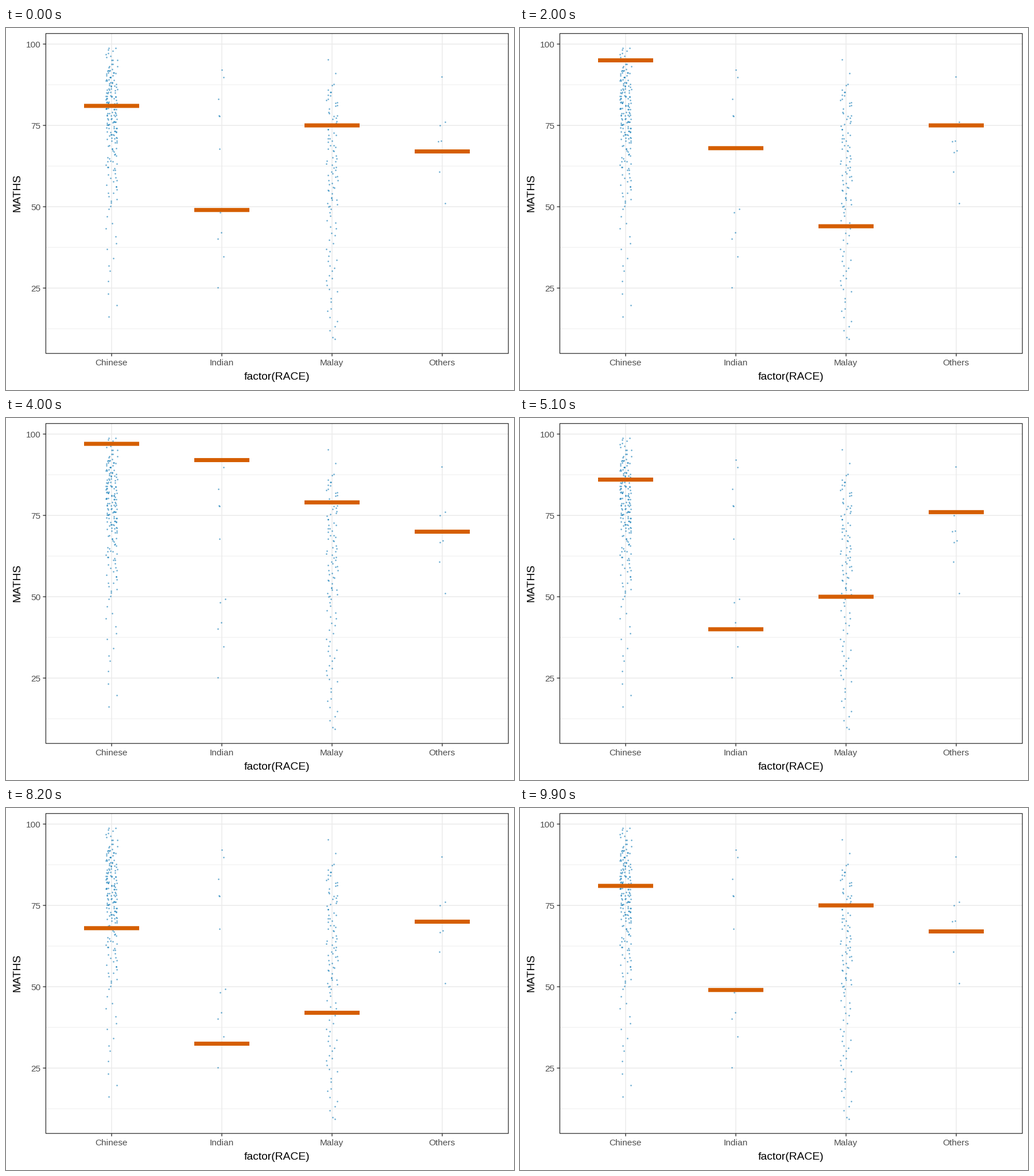
A matplotlib script for the animation above (10000 ms loop, 885 by 632 pixels).

```python
import numpy as np
import matplotlib.pyplot as plt
from matplotlib.animation import FuncAnimation
from matplotlib.patches import Rectangle

W, H, DPI = 885, 632, 100
PX = 72 / DPI
LEFT, RIGHT, TOP, BOTTOM = 69.4, 875.2, 9.6, 568.2
GROUPS = ["Chinese", "Indian", "Malay", "Others"]
CENTERS = 184 + 192 * np.arange(4)
BAR_W, BAR_H = 96, 7.1
DARK, GREY, GRID = "#333333", "#4D4D4D", "#EBEBEB"

plt.rcParams["font.family"] = "Liberation Sans"
plt.rcParams["path.snap"] = False
rng = np.random.default_rng(12)


def y_of(score):
    return 596.05 - 5.68 * score


def spread(count, shares, marks):
    """Whole scores whose cumulative shares pass through the given marks."""
    return np.round(np.interp(np.linspace(0, 1, count), shares, marks))


SCORES = [
    spread(193, [0, .02, .07, .15, .28, .5, .75, .93, 1],
           [16, 30, 50, 60, 70, 78, 86, 93, 99]),
    np.array([25, 35, 40, 42, 48, 49, 68, 78, 78, 83, 90, 92]),
    spread(108, [0, .1, .33, .6, .86, .98, 1], [9, 25, 50, 65, 80, 87, 95]),
    np.array([51, 61, 67, 67, 70, 70, 75, 76, 90]),
]

# Key poses: the score each group's bar rests on, draw by draw
DRAWS = np.array([
    [81, 72, 97, 50, 78, 95, 74, 76, 85, 97, 97, 79, 74,
     86, 86, 73, 81, 86, 82, 74, 77, 59, 82, 82, 85],
    [49, 40, 78, 49, 40, 68, 40, 49, 92, 68, 92, 78, 25,
     40, 25, 42, 35, 25, 25, 92, 25, 40, 25, 42, 68],
    [75, 65, 52, 90, 66, 44, 63, 58, 71, 32, 79, 65, 58,
     50, 67, 57, 30, 84, 79, 24, 52, 32, 65, 77, 71],
    [67, 75, 75, 51, 70, 75, 61, 70, 67, 75, 70, 61, 67,
     76, 70, 70, 67, 70, 70, 75, 70, 70, 75, 67, 67],
]).T

fig = plt.figure(figsize=(W / DPI, H / DPI), dpi=DPI, facecolor="white")
ax = fig.add_axes([0, 0, 1, 1])
ax.set_xlim(0, W)
ax.set_ylim(H, 0)
ax.axis("off")


def line(x0, y0, x1, y1, color, width, z=1):
    ax.plot([x0, x1], [y0, y1], color=color, lw=width * PX,
            solid_capstyle="butt", zorder=z)


def label(x, y, text, size, color, ha="center", **kw):
    ax.text(x, y, text, fontsize=size * PX, color=color, ha=ha, **kw)


for score in np.arange(12.5, 101, 12.5):
    y, major = y_of(score), score % 25 == 0
    line(LEFT, y, RIGHT, y, GRID, 1.5 if major else 0.8)
    if major:
        line(LEFT - 5, y, LEFT, y, DARK, 1.4, 5)
        label(60.3, y + 6, f"{score:.0f}", 15.4, GREY, "right", va="baseline")

for x, name, scores in zip(CENTERS, GROUPS, SCORES):
    line(x, TOP, x, BOTTOM, GRID, 1.5)
    line(x, BOTTOM, x, BOTTOM + 5, DARK, 1.4, 5)
    label(x - 0.3, 589, name, 15.4, GREY, va="baseline")
    n = len(scores)
    ax.scatter(x + rng.uniform(-10, 10, n), y_of(scores + rng.uniform(-.3, .3, n)),
               s=(2.6 * PX) ** 2, color="#0072B2", alpha=0.6, linewidths=0, zorder=2)

label(472, 614, "factor(RACE)", 19.3, "black", va="baseline")
label(28, 288, "MATHS", 19.3, "black", "right", va="center", rotation=90)
ax.add_patch(Rectangle((LEFT, TOP), RIGHT - LEFT, BOTTOM - TOP, fill=False,
                       edgecolor=DARK, lw=1.3 * PX, zorder=4))
bars = [ax.add_patch(Rectangle((x - BAR_W / 2, 0), BAR_W, BAR_H,
                               color="#D55E00", lw=0, zorder=3))
        for x in CENTERS]


def update(frame):
    # Three held steps, then one halfway step; one hold is a step shorter mid-loop
    draw, step = divmod(frame + (frame >= 50), 4)
    now = DRAWS[draw % len(DRAWS)]
    following = DRAWS[(draw + 1) % len(DRAWS)]
    pose = (now + following) / 2 if step == 3 else now
    for bar, score in zip(bars, pose):
        bar.set_y(y_of(score) - BAR_H / 2)
    return bars


anim = FuncAnimation(fig, update, frames=100, interval=100, repeat=True,
                     repeat_delay=0, blit=False)
plt.show()
```
